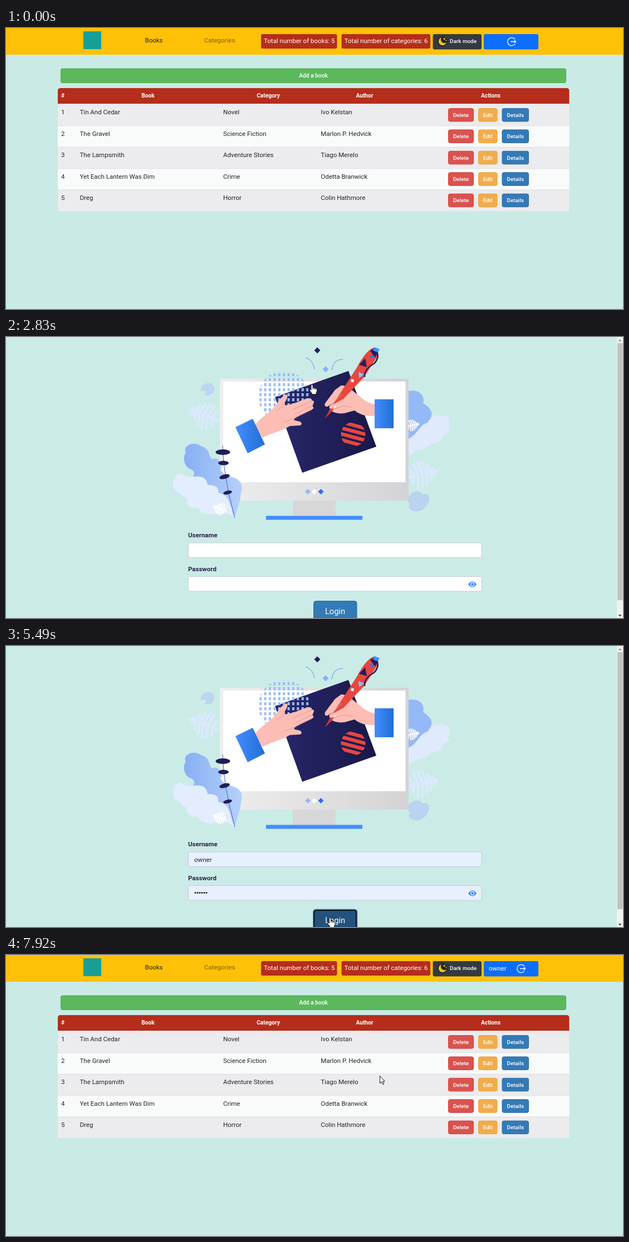
An HTML page for the animation above (8000 ms loop, 1108 by 505 pixels).

```html
<!DOCTYPE html>
<html lang="en">
<head>
<meta charset="utf-8">
<title>Book list</title>
<style>
html, body { margin: 0; width: 100%; height: 100%; overflow: hidden; background: #caeae6; }
svg { position: absolute; left: 0; top: 0; width: 1108px; height: 505px; overflow: visible; font-family: Roboto, Arial, sans-serif; }
#dialog { transform-origin: 552px -90px; font-family: "Open Sans", sans-serif; filter: drop-shadow(0 1px 2px #0008); }
</style>
</head>
<body>
<svg id="page"></svg>
<svg id="dialog"></svg>
<svg id="pointer"></svg>
<script>
const $ = id => document.getElementById(id);
const rect = (x, y, w, h, fill, more = '') => `<rect x="${x}" y="${y}" width="${w}" height="${h}" fill="${fill}" ${more}/>`;
const path = (d, fill, more = '') => `<path d="${d}" fill="${fill}" ${more}/>`;
const line = (d, color, width, more = '') => path(d, 'none', `stroke="${color}" stroke-width="${width}" ${more}`);
const oval = (x, y, rx, ry, fill, more = '') => `<ellipse cx="${x}" cy="${y}" rx="${rx}" ry="${ry}" fill="${fill}" ${more}/>`;
const diamond = (x, y, r, fill) => path(`M${x} ${y - r}l${r} ${r}l${-r} ${r}l${-r} ${-r}z`, fill);
// y is the middle of the capitals
const text = (x, y, str, size, fill, more = '') =>
  `<text x="${x}" y="${y + size * .36}" font-size="${size}" fill="${fill}" ${more}>${str}</text>`;
const mid = 'text-anchor="middle"';
const button = (x, y, w, h, fill, edge, label, size, id = '') =>
  rect(x + .5, y + .5, w - 1, h - 1, fill, `rx="3" stroke="${edge}" id="${id}"`) +
  text(x + w / 2, y + h / 2, label, size, '#fff', mid + ' font-weight="500"');
const grad = (id, a, b, dir = 'x2="1" y2="0"') =>
  `<linearGradient id="${id}" ${dir}><stop stop-color="${a}"/><stop offset="1" stop-color="${b}"/></linearGradient>`;

// ---- book list
const red = '#b52d1b', ink = '#212529';
const books = [
  ['Tin And Cedar', 'Novel', 'Ivo Kelstan'],
  ['The Gravel', 'Science Fiction', 'Marlon P. Hedvick'],
  ['The Lampsmith', 'Adventure Stories', 'Tiago Merelo'],
  ['Yet Each Lantern Was Dim', 'Crime', 'Odetta Branwick'],
  ['Dreg', 'Horror', 'Colin Hathmore']
];

function bookRow(book, i) {
  const y = i * 38.4, top = i ? 137 + y : 136;
  return rect(93, top, 918.5, 175.4 + y - top, i % 2 ? '#f9fbfb' : '#ecebed') +
    rect(93, top, 918.5, 1, '#dee2e6') +
    [i + 1, ...book].map((s, c) => text([99, 132.5, 390, 565.3][c], 151.3 + y, s, 11.5, ink)).join('') +
    button(794, 144 + y, 46, 24.5, '#d9534f', '#d43f3a', 'Delete', 9.9) +
    button(848, 144 + y, 34.5, 24.5, '#f0ad4e', '#eea236', 'Edit', 9.9) +
    button(890.5, 144 + y, 48.5, 24.5, '#337ab7', '#2e6da4', 'Details', 9.9);
}

const library = rect(0, 0, 1108, 48, '#ffc107') +
  rect(139, 6, 32, 32, '#179e98') +
  text(249.5, 22.3, 'Books', 11.5, ink) +
  text(356, 22.3, 'Categories', 11.5, '#806104') +
  rect(458, 11, 136.5, 26, red, 'rx="3"') + text(463, 23.3, 'Total number of books: 5', 11.5, '#fff') +
  rect(602.5, 11, 159.5, 26, red, 'rx="3"') + text(607.5, 23.3, 'Total number of categories: 6', 11.5, '#fff') +
  rect(766.5, 11, 87.5, 27.5, '#343a40', 'rx="3"') +
  oval(784, 24, 9, 9, '#22272f') +
  path('M782 17A7.2 7.2 0 1 0 791 26A6.5 6.5 0 0 1 782 17Z', '#fbbf24') +
  diamond(787, 19.5, 2, '#fbbf24') + diamond(790.5, 22.5, 1.3, '#fbbf24') +
  text(797, 23.7, 'Dark mode', 9.9, '#fff', 'font-weight="500"') +
  rect(858, 11, 98, 27.5, '#0d6efd', 'rx="3"') +
  `<g id="user">${text(867, 23.8, 'owner', 11.5, '#fff')}</g>` +
  line('M6 -4A7.2 7.2 0 1 0 6 4M-2 0H7.5M5 -2.5L7.5 0L5 2.5', '#fff', 1.3, 'id="exit"') +
  button(98, 72.5, 908, 26.5, '#5cb85c', '#4cae4c', 'Add a book', 10.2, 'add') +
  path('M93 136V113Q93 108 98 108H1006.5Q1011.5 108 1011.5 113V136Z', red) +
  [[102, '#'], [255, 'Book'], [471, 'Category'], [644, 'Author'], [870.5, 'Actions']]
    .map(([x, s]) => text(x, 121.8, s, 10.2, '#fff', mid + ' font-weight="700"')).join('') +
  books.map(bookRow).join('');

// ---- login
function fern(x, y, size, turn, fill) {
  let d = 'M-34 0H25';
  for (let i = 0; i < 6; i++) {
    const at = -20 + i * 8, h = [15, 24, 25, 22, 16, 8][i];
    d += `M${at - 5} ${-h}L${at} 0L${at - 5} ${h}`;
  }
  return line(d, fill, 5, `transform="translate(${x} ${y}) rotate(${turn}) scale(${size})" stroke-linejoin="round"`);
}

const pink = '#fcbdb4', navy = '#211f5c', crease = '#e59a93';
const monitor =
  path('M723 97C741 93 753 104 749 119C768 130 767 142 758 152C757 173 745 180 737 188Q730 205 723 212Z', '#94b9f6') +
  path('M723 215V183C741 174 741 158 759 153C760 140 790 135 796 148C797 160 792 163 797 169C786 177 783 177 782 187C763 193 760 192 752 202Q739 200 723 215Z', '#dfeafc') +
  fern(752, 246, 1, -12, '#dbe9fc') + fern(732, 158, .42, -10, '#fff') + fern(351, 139, 1, 200, '#dbe9fc') +
  line('M367 147L385 158', '#dbe9fc', 2) +
  path('M350 98C348 82 368 79 373 88C377 101 365 109 356 103C363 99 358 94 350 98Z', '#bcd5f0') +
  path('M723 287C731 273 747 277 748 283C766 278 762 301 747 311C731 318 718 308 726 299Q719 297 723 287Z', '#b9d3f0') +
  rect(515, 294, 77, 28, '#d7d7d8') + rect(467, 321.5, 173, 7, '#438cff') +
  rect(384, 75, 339, 219, 'url(#case)') + rect(390, 80, 327.5, 181, '#fff') +
  diamond(542, 278, 5, '#94b9f6') + diamond(553.5, 278, 5, '#fff') + diamond(565.5, 278, 5, '#2a76dc');

const drawing =
  path('M483 108L615 61L665 197L532 244Z', 'url(#paper)') +
  oval(623.5, 175, 22, 22, 'url(#stripes)') +
  oval(499, 107, 46, 46, 'url(#dots)') +
  path('M446 160C456 144 474 137 485 122Q494 106 504 103Q508 106 501 117L499 123C516 122 530 113 543 110Q550 110 549 114Q555 114 552 120L550 124Q555 127 549 131L528 140L515 149L528 152Q534 156 528 159L510 160C494 169 476 173 461 181Z', pink) +
  line('M549 115L515 130M551 123L517 139M546 132L513 148L498 153M499 124L485 133', crease, 1) +
  path('M412 162L443 147L465 193L434 209Z', 'url(#cuff)') +
  rect(662, 112, 34, 52, 'url(#cuff)') +
  path('M662 121C647 119 638 108 628 101Q611 86 602 87L591 95L573 119Q571 126 577 125L586 120Q579 128 583 132Q592 139 608 137L626 132Q638 143 662 142Z', pink) +
  path('M573 146L584 126L630 55Q648 21 662 19Q673 24 665 38L643 72L590 128Z', '#e8463f') +
  path('M573 146L581 131L587 132Z', '#c83b39') +
  path('M634 50L645 38L648 54ZM654 25L661 20L667 29L663 37Z', navy) +
  path('M633 63L643 67L634 74Z', '#94b9f6') + diamond(657, 35, 4, '#2a76dc') +
  rect(619.5, 76, 5, 5, '#fff', 'transform="rotate(10 622 79)"') +
  path('M661 18L671 22L667 28L659 24Z', '#438cff') +
  line('M666 27Q671 37 661 48Q643 57 644 72', navy, 2.5) +
  path('M581 128Q578 122 588 121L604 112L622 112Q620 121 606 124L590 129Z', pink) +
  line('M586 120L603 103M590 129L606 124L622 126', crease, 1) + oval(591, 125.5, 2, 1.3, '#fff') +
  diamond(559, 24, 5.5, navy) + diamond(574, 58, 5.5, '#85b1fb') +
  line('M538 37Q552 42 554 58M585 60Q587 40 605 40', '#5d94e6', 1);

const plants =
  path('M411 322C390 306 352 279 336 254C336 247 342 244 333 238C320 235 316 216 323 208C316 195 338 186 350 196C367 201 363 211 369 219C383 216 389 226 385 239C392 250 405 250 414 255C431 266 420 279 421 291Z', 'url(#leaf)') +
  path('M409 324C397 314 390 318 375 318C358 321 350 316 344 307C330 306 323 302 325 291C311 285 317 281 304 277C294 263 304 241 317 247C326 252 331 253 338 251C352 249 361 254 362 266C380 266 382 272 381 280C398 283 401 292 409 324Z', '#e3edfd') +
  fern(382, 308, .45, 200, '#fff') +
  line('M389 195Q390 250 411 325', '#3c66c4', 1) +
  [[389.5, 207, 13, 5, 0], [390.5, 226.5, 9.5, 4, 0], [392.5, 251, 9.5, 4, -15], [398, 279.5, 8, 3.3, -12]]
    .map(([x, y, a, b, r]) => oval(x, y, a, b, '#1f1e57', `transform="rotate(${r} ${x} ${y})"`)).join('');

const field = (y, label) => text(327, y - 13.4, label, 11.5, '#2b2146', 'font-weight="600"') +
  rect(327.5, y + .5, 526.5, 26.5, '#fff', 'rx="3" stroke="#c5cbd8" class="field"');

const login = rect(0, 0, 1108, 505, '#cbebe7') + monitor + drawing + plants +
  field(369.5, 'Username') + field(430, 'Password') +
  '<g id="filled">' + text(338, 383.5, 'owner', 11.5, '#222') +
  [0, 1, 2, 3, 4, 5].map(i => oval(340 + i * 4, 443.5, 1.5, 1.5, '#222')).join('') + '</g>' +
  path('M830 444.5Q837.5 434.5 845 444.5Q837.5 454.5 830 444.5Z', '#2f86f6') +
  oval(837.5, 444.5, 3.7, 3.7, '#e8f0fe') + oval(837.5, 444.5, 2.3, 2.3, '#2f86f6') +
  rect(552.5, 474.5, 77.5, 36, '#337ab7', 'rx="4" stroke="#2e6da4" id="enter"') +
  '<g id="ring">' + rect(551.7, 473.2, 79, 40, 'none', 'rx="5" stroke="#4b8fdb" stroke-width="1.6"') +
  rect(553.3, 475.2, 75.6, 40, 'none', 'rx="3" stroke="#0c1015" stroke-width="1.8"') + '</g>' +
  text(591, 492.3, 'Login', 14.7, '#fff', mid) +
  rect(1097, 0, 11, 505, '#f1f1f1') + rect(1098, 11, 9.5, 462, '#c1c1c1') +
  path('M1099.5 7.5L1102.5 4L1105.5 7.5Z', '#888') + path('M1099.5 499L1102.5 502.5L1105.5 499Z', '#444');

$('page').innerHTML = '<defs>' +
  grad('case', '#efeeee', '#d3d3d6') + grad('paper', '#28276b', '#191849') +
  grad('cuff', '#438cff', '#2270d3') + grad('leaf', '#88aff3', '#b5d0fb') +
  `<pattern id="dots" width="8.4" height="9" patternUnits="userSpaceOnUse">${rect(1.5, 2, 4, 5.5, '#9bbdf8')}</pattern>` +
  `<pattern id="stripes" width="50" height="10.4" patternUnits="userSpaceOnUse" patternTransform="translate(623 176.5) rotate(15)">${rect(0, 0, 50, 6.3, '#e8463f')}</pattern>` +
  `</defs><g id="library">${library}</g><g id="login">${login}</g>`;

// ---- password notice
const gray = '#5f6368', pale = '#dadce0';
$('dialog').innerHTML = rect(368, -60, 368, 260, '#fff', 'rx="4"') + rect(368, -60, 368, 123, '#f8f9fa') +
  line('M368 23Q383 16 397 25', pale, 1.5) + line('M401 30Q421 51 444 35', '#cfcfcf', 4.5) +
  text(412, 15, '*', 25, '#cdcdcd', mid) +
  line('M517 45H577V-5M577 18Q580 2 589 -3', pale, 1.5) + line('M517 42H587', pale, 1) +
  rect(461, -12, 55, 67, '#f8f9fa', `rx="4" stroke="${pale}"`) +
  rect(500, 11, 55, 20, '#fff', `rx="2" stroke="${pale}"`) +
  text(508, 25, '***', 18, '#1a73e8', 'font-weight="700" letter-spacing="1.5"') + rect(545, 15, 1.6, 12, '#1a73e8') +
  path('M489 3L508.5 34H469.5Z', '#e8453c', 'stroke="#e8453c" stroke-linejoin="round"') +
  rect(487.7, 13, 2.6, 9.5, '#fff') + rect(487.7, 25, 2.6, 2.6, '#fff') +
  path('M703 21A7 7 0 0 1 717 21Z', pale) +
  text(381.5, 86.5, 'Change your password', 11.7, '#3c4043') +
  text(381.5, 115.8, 'The password you just used was found in a data breach. Dorvea Password', 9.3, gray) +
  text(381.5, 132.3, 'Manager recommends changing your password now.', 9.3, gray) +
  oval(391, 173.5, 5, 5, 'none', `stroke="${gray}" stroke-width="1.2"`) +
  rect(390.4, 172.8, 1.3, 3.6, gray) + rect(390.4, 170.4, 1.3, 1.4, gray) +
  rect(669.5, 159.5, 54, 28, 'none', 'rx="4" stroke="#8ab4f8" stroke-width="2" id="focus"') +
  rect(670, 160, 53, 27, '#1a73e8', 'rx="3"') +
  text(696, 173.7, 'OK', 9.6, '#fff', mid + ' font-weight="700"');

// ---- pointer
const black = 'stroke="#111" stroke-width="1" stroke-linejoin="round"';
const shapes = {
  arrow: path('M.5 .5V13.5L3.4 10.8L5.5 15.7L7.6 14.8L5.6 10H9.3Z', '#fff', black),
  hand: path('M-1.6 1.5Q0 -.6 1.6 1.5V6Q3 5.4 4 6.6Q5.6 6 6.4 7.4Q9.2 7 9.2 10L8.9 13L7.5 15.5V18H-.4V16L-4.3 11Q-4.8 8.6 -2.8 9L-1.6 10.4Z', '#fff', black) +
    line('M1.6 6V9M4 6.6V9.3M6.4 7.4V9.6', '#111', .9),
  beam: line('M-3 -8H3M0 -8V8M-3 8H3', '#222', 1)
};

// start, end, number of steps, points on the way
const moves = [
  [540, 1310, 11, [[900, 240], [740, 110], [640, 34], [575, 56]]],
  [1420, 1630, 4, [[549.5, 92]]],
  [1880, 1990, 2, [[549.5, 85]]],
  [3150, 3230, 2, [[549, 81]]],
  [3460, 3460, 1, [[488, 305]]],
  [3540, 3860, 5, [[466, 372], [446, 415]]],
  [4040, 4790, 11, [[405, 412], [450, 455], [555, 490], [592, 488]]],
  [4860, 5090, 4, [[582, 488]]],
  [6210, 6650, 7, [[612, 390], [690, 182]]],
  [6730, 6880, 3, [[708, 175]]],
  [7670, 7920, 4, [[671, 217]]]
];

function pointerAt(t) {
  let pos = [1189, 576];
  for (const [from, to, n, stops] of moves) {
    if (t < from) break;
    const step = t >= to ? n : 1 + Math.floor((t - from) / (to - from) * (n - 1));
    const pts = [pos, ...stops], u = step / n * stops.length;
    const i = Math.min(Math.floor(u), stops.length - 1), f = u - i;
    pos = pts[i].map((v, k) => v + (pts[i + 1][k] - v) * f);
  }
  return pos;
}

const inside = ([x, y], l, t, r, b) => x >= l && x < r && y >= t && y < b;
const show = (id, on) => $(id).style.display = on ? '' : 'none';
const paint = (id, fill, edge) => { $(id).setAttribute('fill', fill); $(id).setAttribute('stroke', edge); };

// The notice fades while its lower edge leans towards the viewer
function notice(t) {
  const on = t >= 5870 && t < 7440;
  show('dialog', on);
  if (!on) return;
  let alpha;
  if (t < 7290) {
    const q = Math.min(1, (Math.floor((t - 5870) / 85) * 85 + 72) / 300);
    alpha = 1 - (1 - q) ** 1.7;
  } else alpha = t < 7365 ? .65 : .3;
  const tilt = Math.min(1, (1 - alpha) / .28);
  $('dialog').style.opacity = alpha;
  $('dialog').style.transform = tilt
    ? `translateY(${-6 * tilt}px) perspective(2000px) rotateX(${6.3 * tilt}deg)` : 'none';
  show('focus', t < 7130);
}

function draw(now) {
  const t = now % 8000, p = pointerAt(t);
  const onLogin = t >= 2830 && t < 5640, user = t >= 5640, filled = t >= 3150;
  const onAdd = t < 2830 && inside(p, 98, 72, 1006, 99);
  const onEnter = onLogin && inside(p, 552, 474, 630, 505);
  const pressed = t >= 5410;

  show('library', !onLogin);
  show('login', onLogin);
  show('user', user);
  $('exit').setAttribute('transform', `translate(${user ? 925 : 908} 24.5)`);
  if (t >= 2750 && onAdd) paint('add', '#398439', '#255625');
  else paint('add', ...(onAdd ? ['#449d44', '#398439'] : ['#5cb85c', '#4cae4c']));

  show('filled', filled);
  document.querySelectorAll('.field').forEach(f => f.setAttribute('fill', filled ? '#e8f0fe' : '#fff'));
  paint('enter', ...(pressed ? ['#23527c', '#122b40'] : onEnter ? ['#286090', '#204d74'] : ['#337ab7', '#2e6da4']));
  show('ring', pressed);
  notice(t);

  const onField = onLogin && (inside(p, 327, 370, 854, 397) || inside(p, 327, 430, 854, 457));
  const kind = onAdd || onEnter || (onLogin && !filled) ? 'hand' : onField ? 'beam' : 'arrow';
  $('pointer').innerHTML = t < 540 ? '' : `<g transform="translate(${p[0]} ${p[1]})">${shapes[kind]}</g>`;
}

const start = performance.now();
function tick() {
  draw(performance.now() - start);
  requestAnimationFrame(tick);
}
tick();
</script>
</body>
</html>
```
